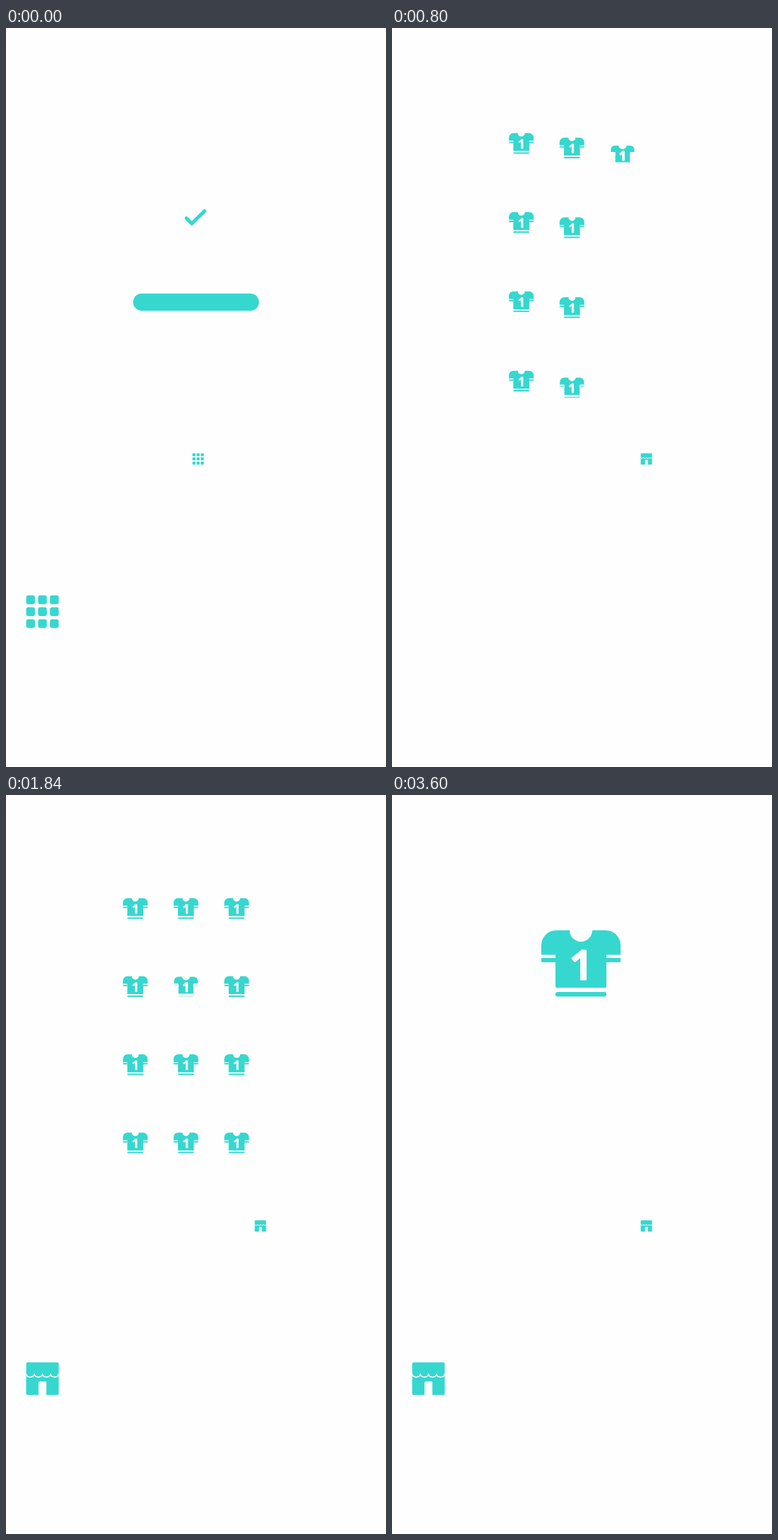
These frames come from a looping animation (537 px wide and 1043 px high, 3.68 s). An HTML page with a canvas:

```html
<!DOCTYPE html>
<html lang="en">
<head>
<meta charset="utf-8">
<title>Shop flow</title>
<style>
  html, body { margin: 0; width: 100%; height: 100%; overflow: hidden; background: #fefefe; }
  canvas { display: block; }
</style>
</head>
<body>
<canvas width="537" height="1043"></canvas>
<script>
const LOOP = 3680, TEAL = '#36d7cf', PAPER = '#fefefe';
const ctx = document.querySelector('canvas').getContext('2d');

// Eased travel left after `age` ms of a quadratic ease-out.
const settle = (age, duration) => Math.max(0, 1 - age / duration) ** 2;
// Edges look thinner close to the moment a shape appears or vanishes.
const thinning = margin => Math.max(0, 2 - margin / 40);

function place(x, y, scale, draw) {
  ctx.save();
  ctx.translate(x, y);
  ctx.scale(scale, scale);
  ctx.lineJoin = ctx.lineCap = 'round';
  draw();
  ctx.restore();
}

function fillThinned(path, thin) {
  ctx.fillStyle = TEAL;
  ctx.fill(path);
  if (thin > 0) {
    ctx.strokeStyle = PAPER;
    ctx.lineWidth = thin;
    ctx.stroke(path);
  }
}

function bar(x, y, w, h, r) {
  const path = new Path2D();
  path.roundRect(x, y, w, h, r);
  return path;
}

function grid(x, y, scale, thin = 0) {
  place(x, y, scale, () => {
    for (let i = 0; i < 9; i++) {
      fillThinned(bar(i % 3 * 16.8, Math.floor(i / 3) * 16.8, 12.4, 12.4, 3), thin);
    }
  });
}

function store(x, y, scale, thin = 0) {
  place(x, y, scale, () => {
    fillThinned(bar(0, 0, 46, 46, 2), thin);
    ctx.fillStyle = ctx.strokeStyle = PAPER;
    ctx.fill(bar(17.4, 27, 11.2, 20, [1.5, 1.5, 0, 0]));
    ctx.lineWidth = Math.max(1.5, 0.8 / scale);
    ctx.beginPath();
    for (let k = 0; k < 4; k++) {
      ctx.ellipse(5.75 + k * 11.5, 16.5, 5.75, 4.2, 0, Math.PI, 0, true);
    }
    ctx.stroke();
  });
}

const torso = new Path2D(
  'M0 34.5V21A21 21 0 0 1 21 0H40A16 16 0 0 0 72 0H91A21 21 0 0 1 112 21V34.5H92' +
  'V79A2 2 0 0 1 90 81H22A2 2 0 0 1 20 79V34.5Z');
const one = new Path2D('M63 28.5L57.5 28L43.5 39.5L47.5 44L56 37.5V69.5H63Z');
const trims = [
  bar(0, 39, 20.5, 6, [1, 0, 0, 1]),
  bar(91.5, 39, 20.5, 6, [0, 1, 1, 0]),
  bar(20, 87, 72, 6.5, 3)
];

function shirt(x, y, scale, thin = 0) {
  place(x, y, scale, () => {
    [torso, ...trims].forEach(part => fillThinned(part, thin / scale));
    ctx.fillStyle = ctx.strokeStyle = PAPER;
    ctx.lineWidth = 2 + thin / scale / 2;
    ctx.fill(one);
    ctx.stroke(one);
  });
}

function confirmation(t) {
  const tick = 280 - t, button = 300 - t;
  if (tick > 0) {
    place(0, 0, 1, () => {
      ctx.strokeStyle = TEAL;
      ctx.lineWidth = 5 - thinning(tick);
      ctx.stroke(new Path2D('M255 268.5L262.5 276L280.7 258.3'));
    });
  }
  if (button > 0) fillThinned(bar(179.7, 374.7, 177.8, 24.3, 12.1), thinning(button));
}

function catalogue(t) {
  for (let i = 0; i < 12; i++) {
    const col = Math.floor(i / 4), row = i % 4;
    const age = t - 475 - 40 * i, left = 2314 + 26 * i - t;
    if (age < 0 || left < 0) continue;
    let thin = thinning(Math.min(age, left));
    if (i === 5 && t > 1700 && t < 1920) {
      thin = 1.5 * Math.sin(Math.PI * (t - 1700) / 220);
    }
    shirt(165.2 + col * 71.6, 145.5 + row * 110.3 + 20 * settle(age, 520), 0.3125, thin);
  }
}

function cornerIcon(t) {
  const x = 28.5, y = 800.8;
  if (t < 660) {
    grid(x, y + 41 * (Math.max(0, t - 275) / 365) ** 2, 1, thinning(660 - t));
  } else if (t > 1340) {
    store(x, y + 41 * settle(t - 1327, 365), 1, thinning(t - 1300));
  }
}

function product(t) {
  const age = t - 2992;
  if (age >= 0) shirt(211, 191, 1, 0, 0);
}

function render(t) {
  ctx.fillStyle = PAPER;
  ctx.fillRect(0, 0, 537, 1043);
  confirmation(t);
  catalogue(t);
  cornerIcon(t);
  const age = t - 2992;
  if (age >= 0) shirt(211, 191 + 20.3 * settle(age, 590), 1, thinning(age));
  if (t < 300) grid(263.5, 600.2, 16 / 46);
  else store(351.5, 600.2, 16 / 46);
}

function tick(now) {
  render(now % LOOP);
  requestAnimationFrame(tick);
}
tick(0);
</script>
</body>
</html>
```
